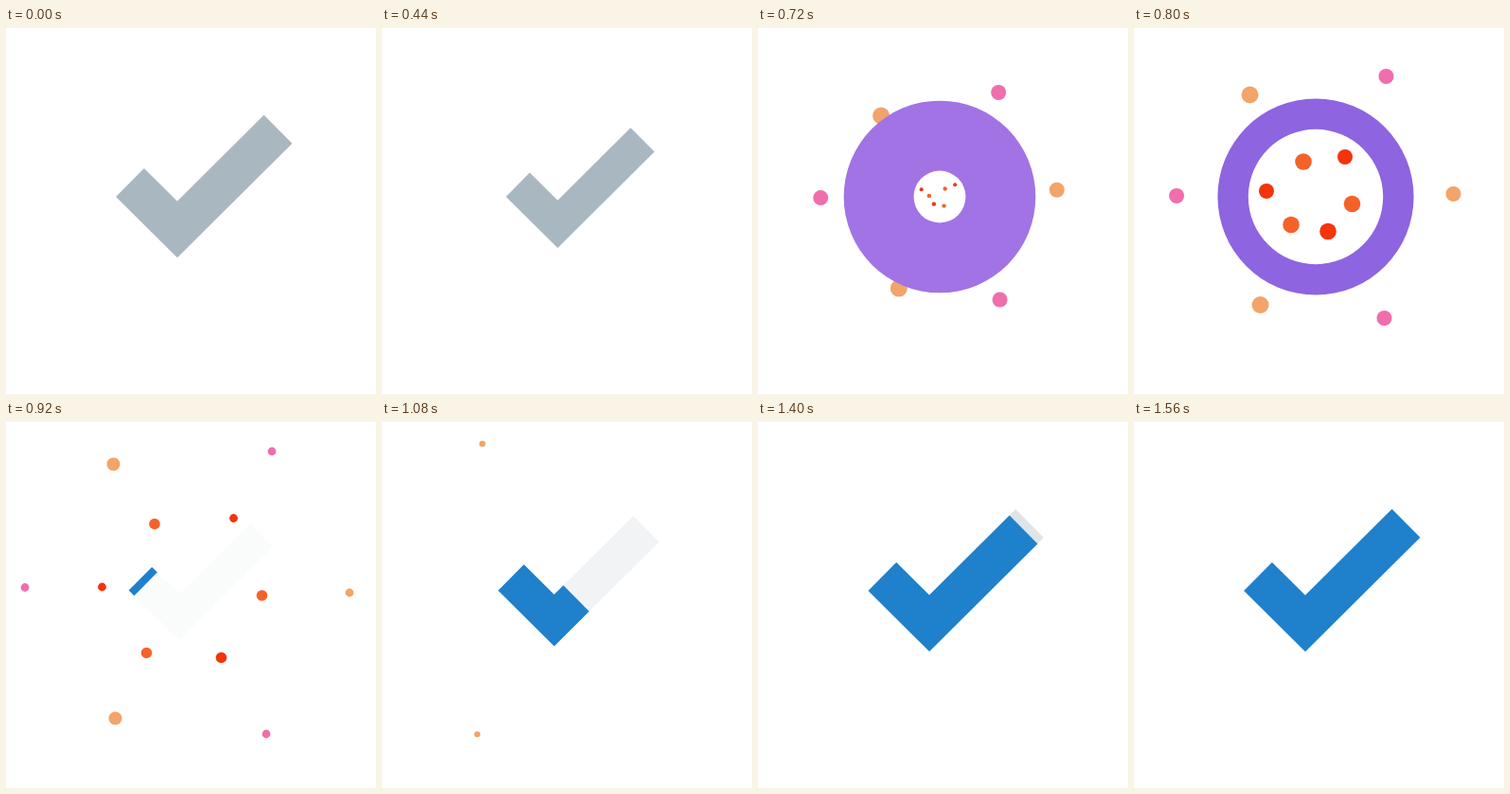
Animation, 391 px wide and 386 px high, one loop 2.44 s. Source, as an HTML page with a canvas:

```html
<!DOCTYPE html>
<html lang="en">
<head>
<meta charset="utf-8">
<title>Check burst</title>
<style>
  html, body { margin: 0; width: 100%; height: 100%; overflow: hidden; background: #fff; }
  canvas { display: block; width: 391px; height: 386px; }
</style>
</head>
<body>
<canvas id="stage" width="391" height="386"></canvas>
<script>
const ctx = document.getElementById('stage').getContext('2d');
const LOOP = 2440, STEP = 40;
const GREY = '#a9b7c0', BLUE = '#1f80cc';
const PINK = '#f06eab', TAN = '#f2a46a', RED = '#f5330c', ORANGE = '#f4622a';
const CENTER = [192, 178];
const CHECK = [[131, 163], [181, 212.5], [287.5, 106.7]];
const CHECK_LENGTH = 220.5;

// colour, position and radius at 800 ms, then at 920 ms
const outerDots = [
  [TAN, 122.5, 70.5, 9, 113.5, 44.5, 7],
  [PINK, 266.5, 51, 8, 281, 31, 4.4],
  [TAN, 337.5, 175, 8, 363, 180, 4.4],
  [PINK, 264.5, 306, 8, 275, 329, 4.4],
  [TAN, 133.5, 292, 9, 115.5, 312.5, 7],
  [PINK, 45, 177, 8, 20, 174.5, 4.4]
];
const innerDots = [
  [ORANGE, 179, 141, 8.8, 157, 107.5, 5.8],
  [RED, 223, 136, 8, 240.5, 101.5, 4.4],
  [ORANGE, 230.5, 185.5, 8.8, 270.5, 183, 5.8],
  [RED, 205, 214.5, 8.8, 227.5, 248.5, 5.8],
  [ORANGE, 166, 207.5, 8.8, 148.5, 243.5, 5.8],
  [RED, 140, 172, 8, 101.5, 174, 4.4]
];

const clamp = x => Math.min(1, Math.max(0, x));
const progress = (t, from, to) => clamp((t - from) / (to - from));
const easeOut = (u, power) => 1 - Math.pow(1 - u, power);
const mix = (a, b, u) => a + (b - a) * u;

function strokeCheck(color, scale, origin, drawn = 1) {
  if (scale <= 0 || drawn <= 0) return;
  ctx.save();
  ctx.translate(...origin);
  ctx.scale(scale, scale);
  ctx.translate(-origin[0], -origin[1]);
  if (drawn < 1) ctx.setLineDash([CHECK_LENGTH * drawn, 999]);
  ctx.beginPath();
  CHECK.forEach(p => ctx.lineTo(...p));
  ctx.lineWidth = 42.4;
  ctx.strokeStyle = color;
  ctx.stroke();
  ctx.restore();
}

function disc(x, y, r, color) {
  if (r <= 0) return;
  ctx.beginPath();
  ctx.arc(x, y, r, 0, Math.PI * 2);
  ctx.fillStyle = color;
  ctx.fill();
}

function drawDots(dots, t, born) {
  if (t < born || t > 1200) return;
  const s = (t - 800) / 120;
  const travel = s * (1.164 - 0.164 * s);
  const shrink = Math.pow(Math.max(0, s), 1.25);
  const grow = progress(t, born - 20, born + 60);
  for (const [color, x0, y0, r0, x1, y1, r1] of dots) {
    disc(mix(x0, x1, travel), mix(y0, y1, travel), mix(r0, r1, shrink) * grow, color);
  }
}

function drawRing(t) {
  if (t <= 450 || t >= 865) return;
  const outer = 103.7 * easeOut(progress(t, 450, 860), 3.53);
  const inner = outer * progress(t, 668, 860);
  const u = (t - 600) / 200;
  const rgb = [mix(191, 142, u), mix(138, 100, u), mix(235, 224, u)].map(Math.round);
  ctx.beginPath();
  ctx.arc(...CENTER, outer, 0, Math.PI * 2);
  ctx.arc(...CENTER, inner, 0, Math.PI * 2, true);
  ctx.fillStyle = `rgb(${rgb})`;
  ctx.fill();
}

function drawNewCheck(t) {
  if (t < 825) return;
  const scale = 1 - 0.253 * Math.pow(1 - progress(t, 825, 1540), 2.4);
  const origin = [192, 175.5];
  const drawn = easeOut(progress(t, 906, 1526), 2);
  if (drawn < 1) {
    ctx.globalAlpha = (t - 825) * 0.00064;
    strokeCheck(GREY, scale, origin);
    ctx.globalAlpha = 1;
  }
  strokeCheck(BLUE, scale, origin, drawn);
}

function draw(t) {
  ctx.fillStyle = '#fff';
  ctx.fillRect(0, 0, 391, 386);
  if (t < 600) strokeCheck(GREY, 1 - 0.158 * Math.max(0, t - 400) / 40, [210.5, 177.5]);
  drawNewCheck(t);
  drawDots(outerDots, t, 640);
  drawDots(innerDots, t, 720);
  drawRing(t);
}

let start;
function tick(now) {
  start ??= now;
  draw(Math.floor(((now - start) % LOOP) / STEP) * STEP);
  requestAnimationFrame(tick);
}
draw(0);
requestAnimationFrame(tick);
</script>
</body>
</html>
```
